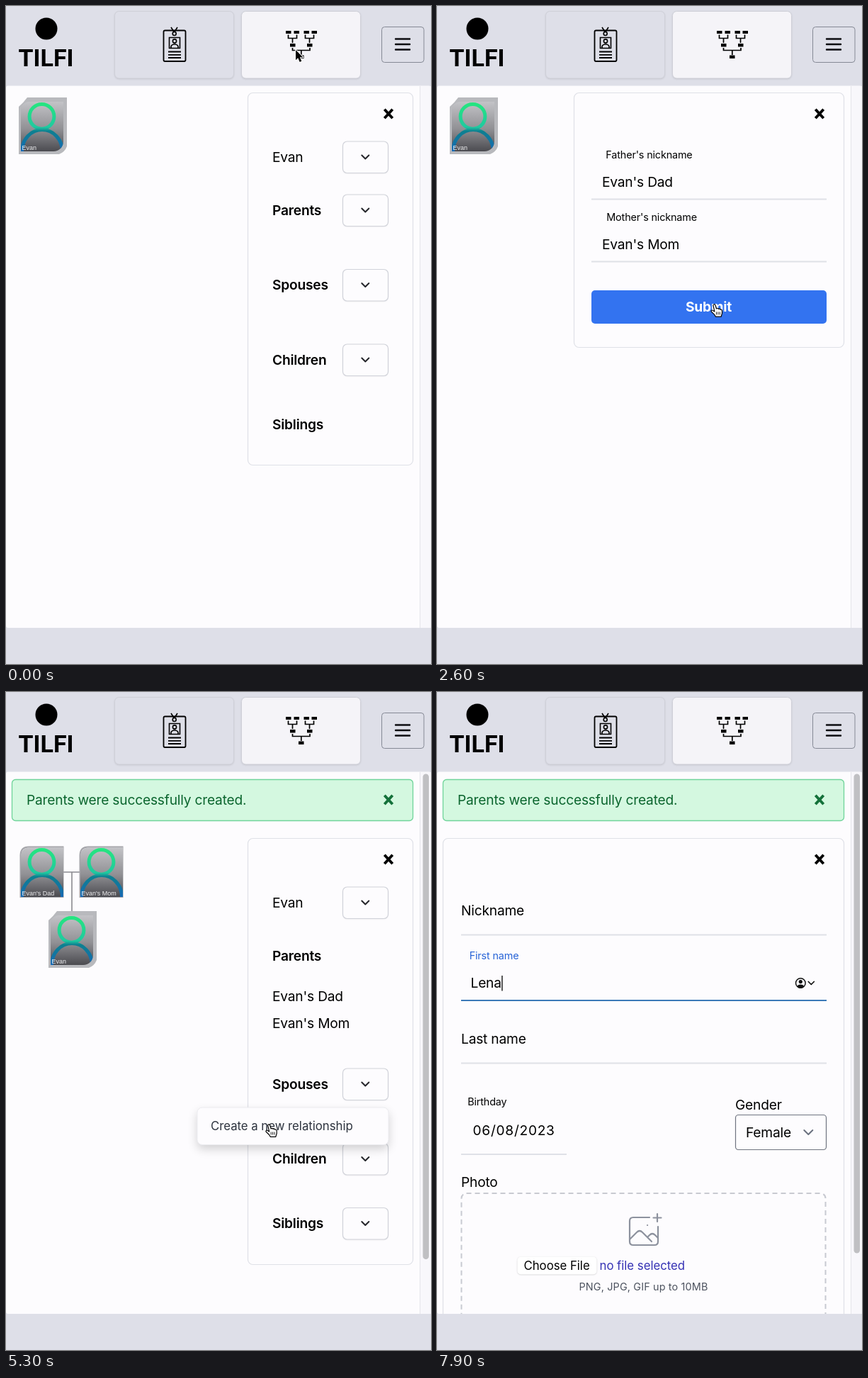
These frames come from a looping animation (600x928 px, 8 s). An HTML page with a canvas:

```html
<!DOCTYPE html>
<html lang="en">
<head>
<meta charset="utf-8">
<title>Family tree</title>
<style>
html, body { margin: 0; width: 100%; height: 100%; overflow: hidden; background: #dedfe8; }
canvas { display: block; width: 600px; height: 928px; }
</style>
</head>
<body>
<canvas id="stage"></canvas>
<script>
const LOOP = 8000, W = 600, H = 928;
const INTER = 'Inter, sans-serif';
const PAGE = '#fdfcfe', LINE = '#dfe1e7';
const PERSON = 'Evan', SPOUSE = 'Lena';

const canvas = document.getElementById('stage');
const dpr = window.devicePixelRatio || 1;
canvas.width = W * dpr;
canvas.height = H * dpr;
const c = canvas.getContext('2d');

const clamp = v => Math.max(0, Math.min(1, v));
const mix = (a, b, p) => a + (b - a) * p;
const smooth = p => p * p * (3 - 2 * p);

// cubic-bezier(.4, 0, .2, 1)
function ease(p) {
  let lo = 0, hi = 1, s = p;
  for (let i = 0; i < 20; i++) {
    s = (lo + hi) / 2;
    const x = 1.2 * s * (1 - s) ** 2 + 0.6 * s * s * (1 - s) + s ** 3;
    if (x < p) lo = s; else hi = s;
  }
  return 3 * s * s * (1 - s) + s ** 3;
}

// Inter is set tighter as it gets larger
const tracking = size => (16.4 - size) * 0.075;

function setFont(size, weight, font, spacing) {
  c.font = `${weight} ${size}px ${font}`;
  c.letterSpacing = spacing + 'px';
}

// Text placed by the middle of its capitals
function text(s, x, y, opts = {}) {
  const { size = 19.2, weight = 400, color = '#000', align = 'left', font = INTER } = opts;
  const { spacing = font === INTER ? tracking(size) : 0 } = opts;
  setFont(size, weight, font, spacing);
  c.textAlign = align;
  c.fillStyle = color;
  c.fillText(s, x, y + size * 0.364);
}

function width(s, size = 19.2) {
  setFont(size, 400, INTER, tracking(size));
  return c.measureText(s).width;
}

function box(x, y, w, h, r, fill, stroke, lw = 1) {
  c.beginPath();
  c.roundRect(x, y, w, h, r);
  if (fill) { c.fillStyle = fill; c.fill(); }
  if (stroke) { c.strokeStyle = stroke; c.lineWidth = lw; c.stroke(); }
}

function path(d, stroke, lw, fill) {
  const p = new Path2D(d);
  if (fill) { c.fillStyle = fill; c.fill(p); }
  if (stroke) { c.strokeStyle = stroke; c.lineWidth = lw; c.stroke(p); }
}

function at(x, y, draw) {
  c.save();
  c.translate(x, y);
  draw();
  c.restore();
}

function shadow(color, blur, dy) {
  c.shadowColor = color;
  c.shadowBlur = blur * dpr;
  c.shadowOffsetY = dy * dpr;
}

function rule(x1, x2, y, color = LINE) {
  c.fillStyle = color;
  c.fillRect(x1, y - 1, x2 - x1, 2);
}

function cross(y, color = '#000') {
  at(540, y, () => path('M-5.7-6.2L5.7 6.2M5.7-6.2L-5.7 6.2', color, 3.9));
}

function chevron(x, y, r = 5, color = '#26272c', lw = 2) {
  at(x, y, () => {
    c.lineCap = c.lineJoin = 'round';
    path(`M${-r} ${-r / 2}L0 ${r / 2}L${r} ${-r / 2}`, color, lw);
  });
}

function badgeIcon() {
  box(222.5, 34.5, 31, 43.5, 2, null, '#000', 1.8);
  path('M233 30L237.5 37L242 30', '#000', 1.6);
  c.beginPath();
  c.arc(237.7, 39, 2.5, 0, 7);
  c.fillStyle = '#dedfe8';
  c.fill();
  c.stroke();
  box(230.5, 44.5, 15, 15, 0, null, '#000', 1.6);
  c.beginPath();
  c.arc(238, 49.5, 2.6, 0, 7);
  c.stroke();
  path('M233 59V57Q234 54 238 54T243 57V59', '#000', 1.6);
  path('M229 64.5H247M229 68.8H247M229 73H247', '#000', 1.8);
}

function treeIcon() {
  c.fillStyle = '#000';
  for (const x of [395, 406.5, 420.5, 431.5]) c.fillRect(x, 35, 7.5, 4);
  for (const x of [401, 425]) c.fillRect(x, 53, 7.5, 4.5);
  c.fillRect(413, 69.5, 7.5, 4.5);
  for (const x of [398.5, 422.5])
    path(`M${x} 40.5V45.5H${x + 12}V40.5M${x + 6} 45.5V52`, '#000', 1.7);
  path('M404.5 59V62.5H429V59M416.8 62.5V69', '#000', 1.7);
}

function header() {
  c.fillStyle = '#dedfe8';
  c.fillRect(0, 0, W, H);
  c.beginPath();
  c.arc(57, 32, 15.5, 0, 7);
  c.fillStyle = '#000';
  c.fill();
  text('TILFI', 56.5, 73, { size: 34, weight: 700, align: 'center', font: 'Roboto, sans-serif' });
  for (const [x, fill] of [[153.5, '#dedfe8'], [332.5, '#f5f4f8']]) {
    c.save();
    shadow('rgba(0,0,0,.13)', 3, 1);
    box(x, 7.5, 168, 94.5, 6, fill);
    c.restore();
    box(x, 7.5, 168, 94.5, 6, null, '#cfd0d8');
  }
  badgeIcon();
  treeIcon();
  box(530.5, 29.5, 59.5, 50, 4, null, '#858995');
  c.lineCap = 'round';
  path('M550 46.5H570M550 54H570M550 61.5H570', '#0d0d10', 2.4);
  c.lineCap = 'butt';
  box(0, 112.5, 600, 764.5, 3, PAGE);
  c.fillStyle = '#f8f7fb';
  c.fillRect(585, 113, 15, 764);
  c.fillStyle = '#e4e4ea';
  c.fillRect(584, 113, 1, 764);
}

// Card of 60 by 70 with a figure outline
function card(x, y, name, selected) {
  at(x, y, () => {
    if (selected) path('M-3 7Q4 1 9-6H65V63Q62 71 54 74H-3Z', null, 0, '#b8b9bd');
    else path('M-.5 70V11Q0-.5 11-.5H59.5V70Z', '#a5a5aa', 2);
    c.save();
    c.beginPath();
    c.roundRect(0, 0, 60, 70, selected ? [12, 0, 14, 0] : [12, 0, 0, 0]);
    c.clip();
    const back = c.createLinearGradient(0, 0, 0, 70);
    back.addColorStop(0, '#c3c3c7');
    back.addColorStop(0.55, '#909094');
    back.addColorStop(1, '#4b4b50');
    c.fillStyle = back;
    c.fillRect(0, 0, 60, 70);
    const ink = c.createLinearGradient(0, 2, 0, 70);
    ink.addColorStop(0, '#25e67f');
    ink.addColorStop(0.5, '#20c9a0');
    ink.addColorStop(0.58, '#0d8090');
    ink.addColorStop(1, '#1769b5');
    c.strokeStyle = ink;
    c.lineWidth = 5;
    c.beginPath();
    c.arc(29.5, 20.8, 17.4, 0, 7);
    c.stroke();
    c.beginPath();
    c.ellipse(30, 70, 28.5, 30.5, 0, Math.PI, 0);
    c.stroke();
    c.restore();
    text(name, 1.5, 65, { size: 9, color: '#f0f0f2', font: '"Liberation Sans", Arial, sans-serif' });
  });
}

function panel(x, y, h) {
  box(x + 0.5, y + 0.5, 574 - x, h, 7, PAGE, LINE, 1.2);
  cross(y + 30);
}

function dropButton(y) {
  c.save();
  shadow('rgba(0,0,0,.08)', 2, 1);
  box(475.5, y - 22, 64, 44.5, 6, PAGE);
  c.restore();
  box(475.5, y - 22, 64, 44.5, 6, null, '#d1d3da', 1.2);
  chevron(507.3, y);
}

function relation(label, y, button = true) {
  text(label, 376, y, { weight: 600 });
  if (button) dropButton(y);
}

function relations(y, hasParents) {
  panel(341, y, hasParents ? 601 : 525);
  text(PERSON, 376, y + 91);
  dropButton(y + 91);
  relation('Parents', y + 166, !hasParents);
  if (hasParents) {
    text(PERSON + "'s Dad", 376, y + 223.5);
    text(PERSON + "'s Mom", 376, y + 261);
  }
  const rest = y + (hasParents ? 347 : 271.5);
  relation('Spouses', rest);
  relation('Children', rest + 105.5);
  relation('Siblings', rest + 196.5, hasParents);
}

function menu(y, label, age) {
  const p = clamp(0.35 + age / 100 * 0.65);
  c.save();
  c.globalAlpha = p;
  c.translate(540, y);
  c.scale(mix(0.95, 1, p), mix(0.95, 1, p));
  c.translate(-540, -y);
  c.save();
  shadow('rgba(0,0,0,.18)', 14, 6);
  box(270, y, 270, 52.5, 7, PAGE);
  c.restore();
  box(270, y, 270, 52.5, 7, null, '#ececf0');
  text(label, 289, y + 25.5, { size: 16.8, color: '#2d333e' });
  c.restore();
}

// Label shrunk around its middle when lifted above the field
function fieldLabel(s, x, y, p, color) {
  at(x + width(s) / 2, y - 28 * p, () => {
    c.scale(mix(1, 0.75, p), mix(1, 0.75, p));
    text(s, 0, 0, { align: 'center', color });
  });
}

function parentsForm() {
  panel(193, 122, 359);
  [['Father', 'Dad', 238], ['Mother', 'Mom', 326]].forEach(([role, short, y]) => {
    fieldLabel(role + "'s nickname", 218, y, 1);
    text(`${PERSON}'s ${short}`, 233, y + 10);
    rule(218, 550, y + 34.5);
  });
  box(218, 401, 332, 47, 5, '#3373f0');
  text('Submit', 383.5, 424.5, { weight: 700, color: '#fff', align: 'center' });
}

function photoField() {
  text('Photo', 34, 691.5);
  c.setLineDash([7, 5]);
  box(34.5, 707, 514, 200, 7, null, '#c8cad1', 2);
  c.setLineDash([]);
  c.lineCap = c.lineJoin = 'round';
  path('M300 741H277Q272 741 272 746V775Q272 780 277 780H307Q312 780 312 775V754', '#8d929e', 2.2);
  path('M272 772L282 762Q286 758 290 762L303 775M297 769L300 766Q304 762 308 766L312 770M297 752H297.1M311 736V747M305.5 741.5H316.5', '#8d929e', 2.2);
  c.lineJoin = 'miter';
  c.lineCap = 'butt';
  c.save();
  shadow('rgba(0,0,0,.2)', 2, 0.5);
  box(113.5, 796.5, 112, 25, 5, '#fff');
  c.restore();
  text('Choose File', 122.5, 808.5, { size: 16.8 });
  text('no file selected', 229.5, 808.5, { size: 16.8, color: '#3532b4' });
  text('PNG, JPG, GIF up to 10MB', 291.5, 839, { size: 14.4, color: '#4d535f', align: 'center' });
}

const FOCUS = 6600, TYPE = 7400, KEY = 130;

function spouseForm(t) {
  panel(8, 206, 720);
  text('Nickname', 34, 308);
  rule(34, 550, 342.5);

  const p = ease(clamp((t - FOCUS) / 300));
  const focused = t >= FOCUS;
  const tint = `rgb(${mix(0, 40, p)},${mix(0, 100, p)},${mix(0, 215, p)})`;
  fieldLabel('First name', 34, 400, p, tint);
  rule(34, 550, 435, focused ? '#3c7ab8' : LINE);
  if (focused) {
    const typed = t < TYPE ? '' : SPOUSE.slice(0, 1 + Math.floor((t - TYPE) / KEY));
    text(typed, 47.5, 410.5);
    if (typed || (t - FOCUS) % 1000 < 500) {
      c.fillStyle = '#000';
      c.fillRect(48 + width(typed), 400, 1.3, 21.5);
    }
    c.beginPath();
    c.arc(513.3, 410.5, 6.8, 0, 7);
    c.strokeStyle = '#111';
    c.lineWidth = 1.5;
    c.stroke();
    c.beginPath();
    c.arc(513.3, 408.6, 2.6, 0, 7);
    c.ellipse(513.3, 415, 4.4, 2.6, 0, 0, 7);
    c.fillStyle = '#111';
    c.fill();
    chevron(528.3, 410.5, 4, '#111', 1.7);
  }

  text('Last name', 34, 489.5);
  rule(34, 550, 523.5);
  fieldLabel('Birthday', 34, 605.5, 1);
  text('06/08/2023', 50.5, 618.5, { spacing: 0.7 });
  rule(34, 183, 652);
  text('Gender', 421, 582);
  box(421.5, 596.5, 128, 49, 4, PAGE, '#6f7480', 1.2);
  text('Female', 436, 621.5);
  chevron(524.3, 621, 6, '#6b7280', 2);
  photoField();
}

function flash() {
  box(8.5, 123.5, 566, 58, 5, '#d4f8e0', '#70d49a', 1.3);
  text('Parents were successfully created.', 29, 152.5, { color: '#0c662f' });
  cross(152, '#14713a');
}

function family() {
  path('M81 254H105M93 254V310', '#8b8b90', 1.6);
  card(21, 219, PERSON + "'s Dad");
  card(105, 219, PERSON + "'s Mom");
  card(63, 315, PERSON, true);
}

// time, x, y of the pointer's hot spot
const route = [
  [100, 409, 62], [600, 505, 286], [800, 505, 286], [1400, 413, 350],
  [2000, 413, 350], [2700, 390, 425], [2900, 390, 425], [3600, 92, 352],
  [3900, 92, 352], [4200, 127, 360], [4650, 503, 552], [4750, 503, 552],
  [5300, 371, 610], [5600, 371, 610], [6400, 107, 398], [LOOP, 107, 398]
];
const handSpans = [[520, 2950], [3450, 4000], [4600, 5650]];

function pointer(t) {
  if (t >= TYPE) return;
  const i = route.findIndex(k => k[0] > t);
  const b = route[i], a = route[i - 1] || b;
  const p = a === b ? 0 : smooth((t - a[0]) / (b[0] - a[0]));
  const hand = handSpans.some(([s, e]) => t >= s && t < e);
  at(mix(a[1], b[1], p), mix(a[2], b[2], p), () => {
    c.lineJoin = 'round';
    if (hand) {
      c.translate(-5, -1);
      path('M3.7 2.4C3.5.5 6.2.2 6.7 2L8.2 7C9 5.9 10.6 6.2 11 7.4C12 6.6 13.2 7 13.6 8.2C15 7.6 16.2 8.5 16.2 10V13.5L14.8 18.3H7.2L5.6 15.5L1.2 11.2C.2 9.6 2 8.5 3.2 9.5L5.6 11Z', '#000', 1.2, '#fff');
      path('M8.2 11.5V15.5M10.6 11.5V15.5M13 11.5V15.5', '#000', 0.9);
    } else {
      const arrow = 'M0 0V14.2L3.2 11.2L5.7 17L8.3 15.8L5.8 10.2H10.2Z';
      path(arrow, '#fff', 2);
      path(arrow, null, 0, '#000');
    }
  });
}

function content(t) {
  if (t < 2900) {
    card(21, 135, PERSON, true);
    if (t < 2000) relations(122, false);
    else parentsForm();
    if (t >= 800 && t < 2000) menu(321, 'Create parents', t - 800);
    return;
  }
  flash();
  box(588.5, 115.5, 8.5, t < 5600 ? 684.5 : 676, 4.25, '#c0c0c3');
  if (t >= 5600) return spouseForm(t);
  family();
  if (t < 3800) {
    c.fillStyle = LINE;
    c.fillRect(573, 206, 2, 2);
  } else relations(206, true);
  if (t >= 4750) menu(586, 'Create a new relationship', t - 4750);
}

function draw(t) {
  c.setTransform(dpr, 0, 0, dpr, 0, 0);
  c.lineCap = 'butt';
  c.lineJoin = 'miter';
  header();
  c.save();
  c.beginPath();
  c.rect(0, 112, W, 765);
  c.clip();
  content(t);
  c.restore();
  pointer(t);
}

const start = performance.now();
function tick() {
  draw((performance.now() - start) % LOOP);
  requestAnimationFrame(tick);
}
tick();
</script>
</body>
</html>
```
